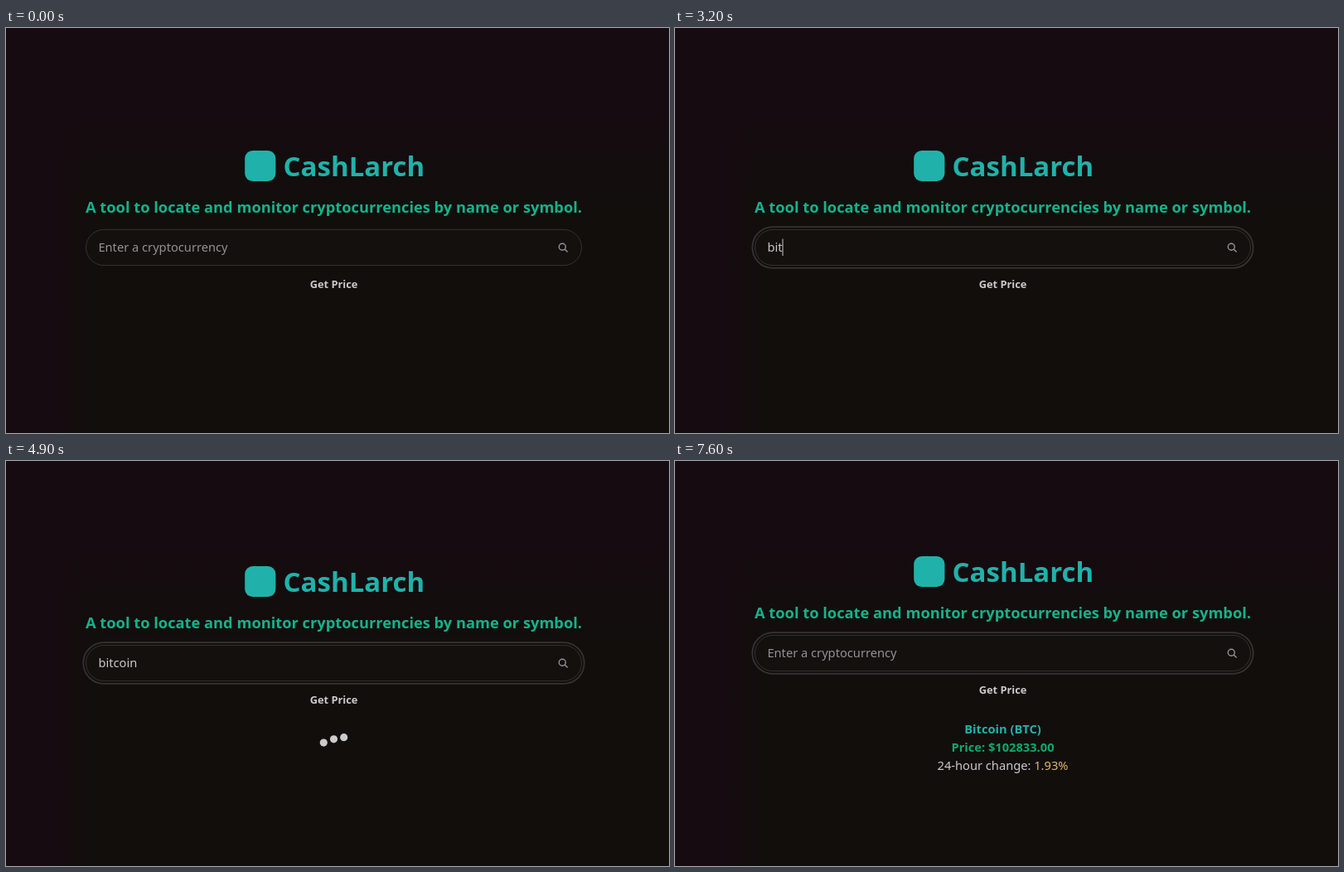
An HTML page that plays this animation: 800x489 px, repeating every 8000 ms.

```html
<!DOCTYPE html>
<html lang="en">
<head>
<meta charset="utf-8">
<title>Cryptocurrency lookup</title>
<style>
  html, body { margin: 0; width: 100%; height: 100%; overflow: hidden; }
  body {
    background:
      linear-gradient(to bottom, #150b10 100px, #150b1000 215px),
      linear-gradient(to right, #150b10 60px, #150b1000 105px),
      #120e0c;
  }
  svg { display: block; width: 800px; height: 489px; }
  text { font: 14.67px "Noto Sans", "Open Sans", sans-serif; fill: #c9c9c9; }
  .mid { text-anchor: middle; }
  .title { font-size: 33px; font-weight: 700; fill: #20b2aa; }
  .tagline { font-size: 18.3px; font-weight: 700; fill: #16b28b; }
  .button { font-size: 12.83px; font-weight: 700; }
  .coin { font-weight: 700; fill: #20b2aa; }
  .price { font-weight: 700; fill: #10a86c; }
  .change { fill: #dfba62; }
  .empty { fill: #949191; }
  .line { fill: none; stroke: #373230; }
  .icon { fill: none; stroke: #979494; stroke-width: 1.4; stroke-linecap: round; }
  #dots, #caret { fill: #cbcbcb; }
</style>
</head>
<body>
<svg viewBox="0 0 800 489">
  <g id="page">
    <rect x="288.2" y="148" width="37.2" height="37" rx="9.5" fill="#20b2aa"/>
    <text class="title" x="334.6" y="179">CashLarch</text>
    <text class="tagline mid" x="395.5" y="222.9">A tool to locate and monitor cryptocurrencies by name or symbol.</text>

    <rect class="line" x="96.5" y="243.4" width="598" height="43.2" rx="21.6" style="fill:#14100e"/>
    <rect class="line" id="ring" x="93.3" y="240.2" width="604.4" height="49.6" rx="24.8" stroke-width="1.8"/>
    <text id="field" x="111.4" y="270.4"></text>
    <rect id="caret" y="254.6" width="1" height="20.4"/>
    <g class="icon">
      <circle cx="671.3" cy="264.2" r="4"/>
      <path d="M674.3 267.2l2.9 2.9"/>
    </g>
    <text class="button mid" x="395.5" y="313.6">Get Price</text>
  </g>

  <g id="dots">
    <circle cx="383.3" r="4.6"/>
    <circle cx="395.5" r="4.6"/>
    <circle cx="407.7" r="4.6"/>
  </g>

  <g id="result" class="mid">
    <text class="coin" x="395.5" y="329">Bitcoin (BTC)</text>
    <text class="price" x="395.5" y="351">Price: $102833.00</text>
    <text x="395.5" y="373">24-hour change: <tspan class="change">1.93%</tspan></text>
  </g>
</svg>
<script>
  const LOOP = 8000, FOCUS = 1600, LOADING = 4400, LOADED = 5000;
  const WORD = "bitcoin", HINT = "Enter a cryptocurrency";
  const TYPED = [3000, 3100, 3200, 3500, 3600, 3700, 3800];
  const ERASED = [6400, 6500, 6600, 6700, 6900, 7000, 7200];
  const CARET_ON = [[1600, 1900], [2600, 2800], [3000, 4000], [5200, 6400], [6500, 7600]];

  const get = id => document.getElementById(id);
  const [page, ring, field, caret, dots, result] =
    ["page", "ring", "field", "caret", "dots", "result"].map(get);
  const show = (el, on) => el.style.display = on ? "" : "none";
  const passed = (times, t) => times.filter(x => t >= x).length;

  // Each dot hops along a parabola for 600 ms, then rests until 1050 ms.
  function hop(ms) {
    const p = ms < 0 ? 0 : Math.min(ms % 1050 / 300, 2);
    return 9.2 * (1 - (1 - p) ** 2);
  }

  function draw(t) {
    const shift = t < LOADING ? 0 : t < LOADED ? -21 : -33;
    page.setAttribute("transform", `translate(0 ${shift})`);
    show(ring, t >= FOCUS);
    show(result, t >= LOADED);

    const text = WORD.slice(0, passed(TYPED, t) - passed(ERASED, t));
    field.textContent = text || HINT;
    field.setAttribute("class", text ? "" : "empty");
    caret.setAttribute("x", 111.4 + (text ? field.getComputedTextLength() : 0));
    show(caret, CARET_ON.some(([from, to]) => t >= from && t < to));

    show(dots, t >= LOADING && t < LOADED);
    [...dots.children].forEach((dot, i) =>
      dot.setAttribute("cy", 342.6 - hop(t - LOADING + 54 - i * 100)));
  }

  function tick() {
    draw(performance.now() % LOOP);
    requestAnimationFrame(tick);
  }
  tick();
</script>
</body>
</html>
```
